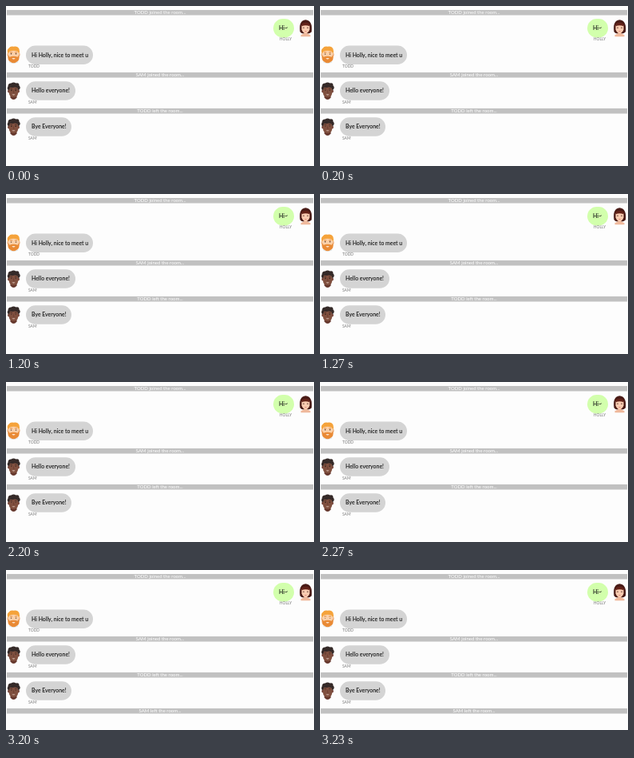
Recreate the animation shown at these times as an HTML page. Size 386 by 200 pixels, loop 3.26 s.

```html
<!DOCTYPE html>
<html lang="en">
<head>
<meta charset="utf-8">
<title>Chat room</title>
<style>
  html, body { margin: 0; width: 100%; height: 100%; overflow: hidden; background: #fdfdfd; }
  svg { display: block; width: 100%; height: 100%; }
  text { font-family: Lato, sans-serif; }
  .notice rect { fill: #c1c1c1; }
  .notice text { fill: #fff; font-size: 6px; text-anchor: middle; }
  .message { fill: #161616; font-size: 6.9px; font-weight: 600; }
  .name { fill: #777; font-size: 4.9px; }
</style>
</head>
<body>
<svg id="stage" viewBox="0 0 386 200">
  <defs>
    <g id="ginger">
      <path d="M-6 8Q0 13 6 8L5 10Q0 12-5 10Z" fill="#d9e0e2"/>
      <ellipse cx="-7" cy="0" rx="1.3" ry="2" fill="#f3bd93"/>
      <ellipse cx="7" cy="0" rx="1.3" ry="2" fill="#f3bd93"/>
      <rect x="-6.3" y="-8" width="12.6" height="16" rx="6" fill="#fbd0a8"/>
      <path d="M-7-1Q-9-6-6-8Q-4-11 0-10Q5-11 7-7Q8-4 7-1L5-4Q0-6-5-4Z" fill="#f5a33b"/>
      <path d="M-7 0L-5 3Q0 1 5 3L7 0Q8 7 4 9Q0 12-4 9Q-8 7-7 0Z" fill="#e98a35"/>
      <path d="M-2.2 4.5Q0 7 2.2 4.5Z" fill="#fff"/>
      <path d="M-4.5-2.7h3M1.5-2.7h3" stroke="#d77b2d" stroke-width=".8"/>
      <g class="eyes" fill="#50372c"><circle cx="-3" cy="-.9" r=".8"/><circle cx="3" cy="-.9" r=".8"/></g>
    </g>
    <g id="curly">
      <path d="M-4 5H4V9Q0 14-4 9Z" fill="#65372c"/>
      <ellipse cx="-6" cy="1" rx="1.4" ry="2" fill="#74443a"/>
      <ellipse cx="6" cy="1" rx="1.4" ry="2" fill="#74443a"/>
      <rect x="-5.7" y="-7" width="11.4" height="15.5" rx="5.4" fill="#80503f"/>
      <path d="M-6 0Q-9-2-7-5Q-7-9-3-9Q0-11 3-9Q7-10 7-6Q10-3 6 0L5-3Q3-4 1-4Q-2-3-4-4Z" fill="#352a28"/>
      <path d="M-4-1.8h2.5M1.5-1.8h2.5" stroke="#3b2923" stroke-width=".7"/>
      <path d="M0 0v3h1" fill="none" stroke="#65382d" stroke-width=".6"/>
      <path d="M-2 5Q0 6.8 2 5Z" fill="#efd8cf"/>
      <g class="eyes" fill="#271b18"><circle cx="-2.7" cy="0" r=".7"/><circle cx="2.7" cy="0" r=".7"/></g>
    </g>
    <g id="bobcut">
      <path d="M-7 5Q-9-9 0-10Q9-9 7.5 5Q5 8 0 7Q-5 8-7 5Z" fill="#491b16"/>
      <path d="M-2 4H2V7L6 9V11H-6V9L-2 7Z" fill="#efb99c"/>
      <path d="M-5-3Q0-5 5-3V2Q4 6 0 7Q-4 6-5 2Z" fill="#f9cbb0"/>
      <path d="M-5-2V-5Q0-8 5-5V-2Q0-4-5-2Z" fill="#642319"/>
      <path d="M-1.5 4Q0 5.4 1.5 4Z" fill="#cf5d5d"/>
      <g fill="#48231e"><circle cx="-2.5" cy="0" r=".7"/><circle cx="2.5" cy="0" r=".7"/></g>
    </g>
  </defs>
</svg>
<script>
const LOOP = 3260;
const stage = document.getElementById('stage');
const people = { ginger: 'TODD', bobcut: 'HOLLY', curly: 'SAM' };

function add(markup) {
  stage.insertAdjacentHTML('beforeend', markup);
  return stage.lastElementChild;
}

function notice(y, text) {
  return add(`<g class="notice"><rect x="1" y="${y}" width="384" height="6.5"/>
    <text x="193" y="${y + 5.2}">${text}</text></g>`);
}

function message(person, y, width, text, own = false) {
  const x = own ? 335 : 25;
  add(`<g>
    <rect x="${x}" y="${y}" width="${width}" height="23.5" rx="11.75" fill="${own ? '#d2ffac' : '#d4d4d4'}"/>
    <text class="message" x="${x + 7}" y="${y + 14}">${text}</text>
    <text class="name" x="${own ? 358 : 28}" y="${y + 27.3}" text-anchor="${own ? 'end' : 'start'}">${people[person]}</text>
    <use href="#${person}" x="${own ? 375.5 : 9.5}" y="${y + 11.2}"/></g>`);
}

notice(5, `${people.ginger} joined the room...`);
message('bobcut', 16, 26, 'Hi~', true);
message('ginger', 49.5, 84, 'Hi Holly, nice to meet u');
notice(83, `${people.curly} joined the room...`);
message('curly', 94.3, 62, 'Hello everyone!');
notice(128, `${people.ginger} left the room...`);
message('curly', 139.2, 57, 'Bye Everyone!');
const departure = notice(173, `${people.curly} left the room...`);
const eyes = document.querySelectorAll('.eyes');

function draw(now) {
  const time = now % LOOP;
  const blink = (time + 800) % 1000;
  const openness = blink < 30 ? 0.65 : blink < 70 ? 0.3 : 1;
  eyes.forEach(pair => pair.setAttribute('transform', `scale(1 ${openness})`));
  departure.setAttribute('visibility', time < 2300 ? 'hidden' : 'visible');
}

const start = performance.now();
function tick() {
  draw(performance.now() - start);
  requestAnimationFrame(tick);
}
tick();
</script>
</body>
</html>
```
